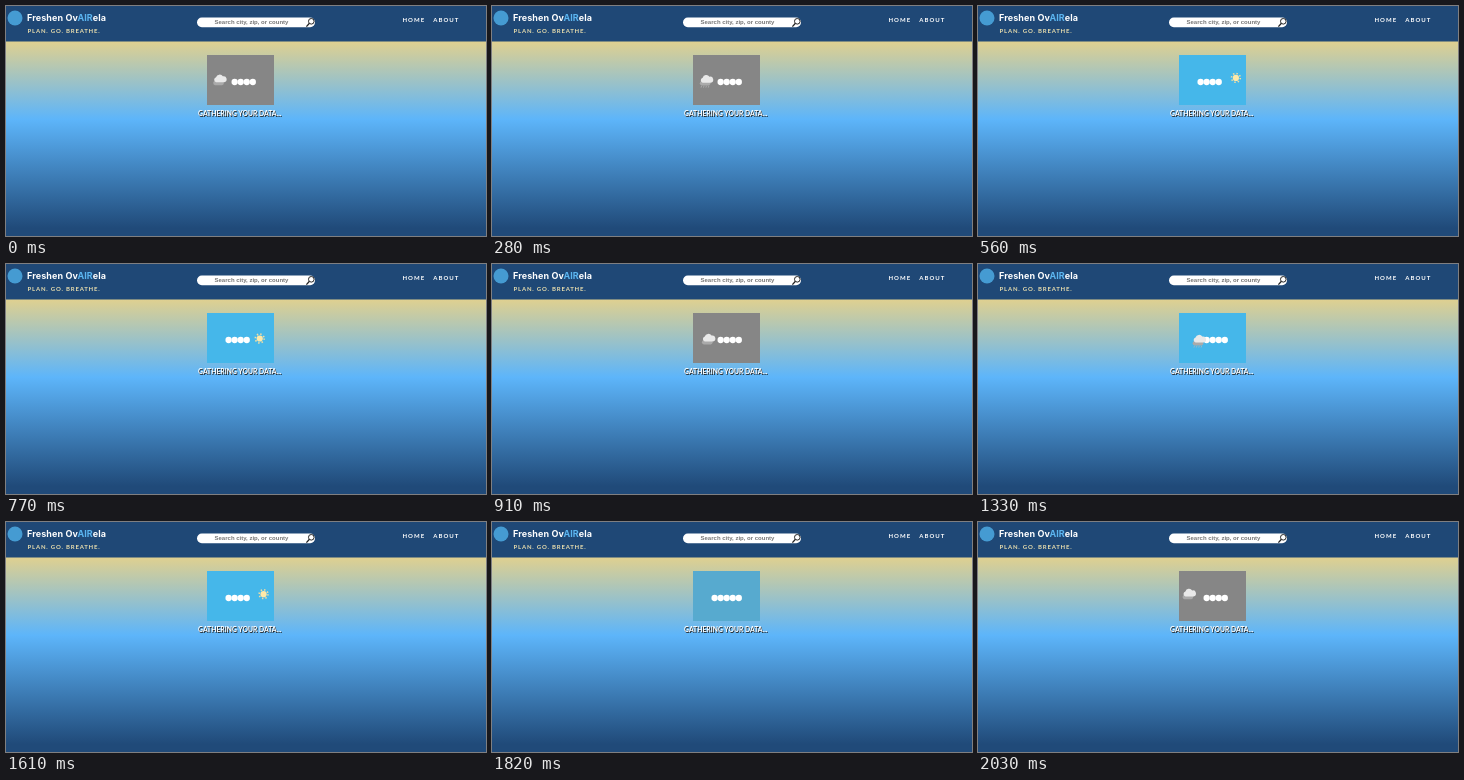
An HTML page that plays this animation: 480 by 230 pixels, repeating every 2100 ms.

```html
<!DOCTYPE html>
<html lang="en">
<meta charset="utf-8">
<title>Gathering your data</title>
<style>
  html, body { margin: 0; width: 100%; height: 100%; overflow: hidden; background: #1f4876; }
  svg { display: block; }
  text { font-family: Lato, sans-serif; font-weight: 700; fill: #fff; }
  .title { font: 700 9px Inter, sans-serif; letter-spacing: .1px; }
  .tag { font-size: 6px; letter-spacing: .8px; fill: #eadfae; }
  .nav { font-size: 6px; letter-spacing: 1px; }
  .search { font: 700 6px "Liberation Sans", sans-serif; fill: #777; }
  .status { font-size: 6.8px; }
</style>
<svg width="480" height="230" viewBox="0 0 480 230">
  <defs>
    <linearGradient id="sky" x2="0" y2="1">
      <stop stop-color="#dfd090"/>
      <stop offset=".4" stop-color="#5db5fa"/>
      <stop offset=".96" stop-color="#204a79"/>
    </linearGradient>
  </defs>
  <rect width="480" height="36" fill="#1f4876"/>
  <rect y="35.5" width="480" height="194.5" fill="url(#sky)"/>

  <circle cx="9" cy="12" r="7.5" fill="#459bd2"/>
  <text class="title" x="21" y="15.4">Freshen Ov<tspan fill="#5bb5f0">AIR</tspan>ela</text>
  <text class="tag" x="21.5" y="27">PLAN. GO. BREATHE.</text>
  <rect x="191" y="11.5" width="118" height="9.7" rx="4.8" fill="#fff"/>
  <text class="search" x="245.5" y="18.3" text-anchor="middle">Search city, zip, or county</text>
  <g fill="none" stroke="#222">
    <circle cx="305.3" cy="15.3" r="2.8"/>
    <path d="M303.2 17.5L300.4 20.6" stroke-width="1.3"/>
  </g>
  <text class="nav" x="396.5" y="16.3">HOME</text>
  <text class="nav" x="427.3" y="16.3">ABOUT</text>

  <rect id="panel" x="201" y="49" width="67" height="50"/>
  <g id="balls" fill="#fff"></g>
  <g id="cloud">
    <path d="M-5 5.5a2.3 2.3 0 0 1 0-4.5h7a2.3 2.3 0 0 1 0 4.5z" fill="#aaa"/>
    <path d="M-4 2.6a2.6 2.6 0 0 1 0-5 3.8 3.8 0 0 1 6.8-1 3 3 0 0 1 1.4 6z" fill="#e9e9e9"/>
    <path id="rain" d="M-5 5.8l-.6 1.8M-2.6 5.8l-.6 1.8M-.2 5.8l-.6 1.8M2.2 5.8l-.6 1.8"
      stroke="#b5b5b5" stroke-width=".7"/>
  </g>
  <g id="sun">
    <circle r="4.4" fill="none" stroke="#f5dda0" stroke-width="1.6" stroke-dasharray="1.4 2.056"/>
    <circle r="3.1" fill="#ffe9a8"/>
  </g>
  <text class="status" x="192.8" y="111.2" style="fill:#222">GATHERING YOUR DATA...</text>
  <text class="status" x="192" y="110.3">GATHERING YOUR DATA...</text>
</svg>
<script>
  const LOOP = 2100, STEP = 70, PERIOD = 940, HALF = PERIOD / 2, START = 66;
  const FIRST = 222.6, GAP = 6.05, REST_Y = 76, LENGTH = 17, MAX_ANGLE = 0.72;
  const BLUE = [69, 183, 234], GRAY = [134, 134, 134];
  const get = id => document.getElementById(id);
  const panel = get("panel"), cloud = get("cloud"), sun = get("sun"), rain = get("rain");
  const clamp = v => Math.max(0, Math.min(1, v));

  const balls = Array.from({ length: 5 }, (_, i) => {
    const ball = document.createElementNS("http://www.w3.org/2000/svg", "circle");
    ball.setAttribute("cx", FIRST + i * GAP);
    ball.setAttribute("cy", REST_Y);
    ball.setAttribute("r", 3.15);
    return get("balls").appendChild(ball);
  });

  // Fast rise, slower fall; 0 at rest and 1 at the top
  function swing(time) {
    const u = time / HALF * 2 - 1;
    if (Math.abs(u) > 0.97) return 0;
    return u < 0 ? 1 - u ** 4 : 1 - u ** 1.5;
  }

  function place(icon, ball, side, amount) {
    const angle = amount * MAX_ANGLE;
    const x = +ball.getAttribute("cx") + side * LENGTH * Math.sin(angle);
    const y = REST_Y - LENGTH * (1 - Math.cos(angle));
    icon.setAttribute("transform", `translate(${x} ${y})`);
    icon.style.display = amount ? "" : "none";
    ball.style.display = amount ? "none" : "";
  }

  function draw(now) {
    const time = Math.floor(now % LOOP / STEP) * STEP;
    const phase = (time + START) % PERIOD;
    place(cloud, balls[0], -1, phase < HALF ? swing(phase) : 0);
    place(sun, balls[4], 1, phase < HALF ? 0 : swing(phase - HALF));
    rain.style.opacity = clamp((phase - 240) / 80);

    const gray = phase < HALF ? clamp(phase / 22) * clamp((440 - phase) / 40) : 0;
    panel.setAttribute("fill", `rgb(${BLUE.map((b, i) => Math.round(b + (GRAY[i] - b) * gray))})`);
    requestAnimationFrame(() => draw(performance.now() - begin));
  }

  const begin = performance.now();
  draw(0);
</script>
</html>
```
